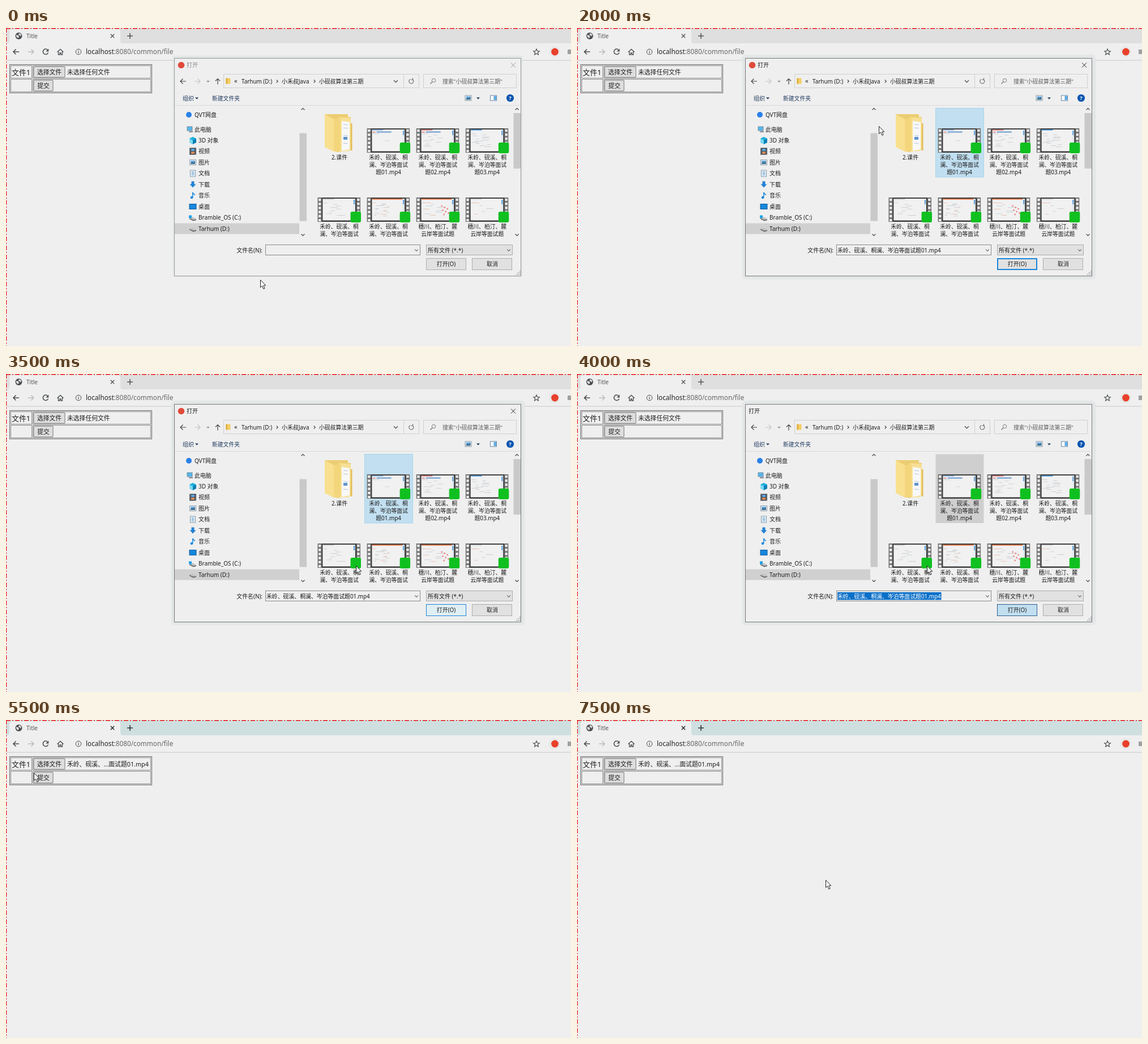
These frames come from a looping animation (998x561 px, 8000 ms). An HTML page:

```html
<!DOCTYPE html>
<html lang="zh-CN">
<head>
<meta charset="utf-8">
<style>
html, body { margin: 0; width: 998px; height: 561px; overflow: hidden; background: #efefef }
svg { display: block; font-family: "Noto Sans", "Noto Sans CJK SC", "Noto Sans CJK", sans-serif; white-space: pre }
</style>
</head>
<body>
<svg id="stage" width="998" height="561" viewBox="0 0 998 561"></svg>
<script>
const STEP = 500, STEPS = 16;
const BG = '#efefef', INK = '#1c1c1c', BLUE = '#1c86da';
const cursorAt = [[449, 444], [432, 391], [533, 173], [533, 173], [533, 173], [618, 339], [618, 339], [618, 338],
  [618, 338], [614.5, 336.5], [192, 221], [49, 93], [48, 89], [48, 87], [84, 108], [439, 282]];
const fileName = '禾岭、砚溪、桐澜、岑泊等面试题01.mp4';

const rect = (x, y, w, h, fill = 'none', stroke = 'none', rx = 0) =>
  `<rect x="${x}" y="${y}" width="${w}" height="${h}" fill="${fill}" stroke="${stroke}" rx="${rx}"/>`;
// A crisp one-pixel frame on the pixel grid
const box = (x, y, w, h, stroke, fill = 'none') => rect(x + .5, y + .5, w - 1, h - 1, fill, stroke);
const dot = (x, y, r, fill, stroke = 'none') => `<circle cx="${x}" cy="${y}" r="${r}" fill="${fill}" stroke="${stroke}"/>`;
const line = (d, stroke = '#444', w = 1, extra = '') =>
  `<path d="${d}" fill="none" stroke="${stroke}" stroke-width="${w}" ${extra}/>`;
const fill = (d, color) => `<path d="${d}" fill="${color}"/>`;
const text = (x, mid, s, size = 9.9, color = INK, anchor = 'start') =>
  `<text x="${x}" y="${mid + size * .36}" font-size="${size}" fill="${color}" text-anchor="${anchor}">${s}</text>`;
const chevron = (x, y, r, dir, color = '#444', w = 1.1) => line(dir === 'right'
  ? `M${x - r / 2} ${y - r}l${r} ${r}l${-r} ${r}`
  : `M${x - r} ${y - (dir === 'up' ? -r : r) / 2}l${r} ${dir === 'up' ? -r : r}l${r} ${dir === 'up' ? r : -r}`, color, w);
const cross = (x, y, r, color, w = 1.2) => line(`M${x - r} ${y - r}l${2 * r} ${2 * r}m0 ${-2 * r}l${-2 * r} ${2 * r}`, color, w);
const arrow = (x, y, dir, color, w = 1.4) =>
  line(`M${x - 5} ${y}h10m${dir > 0 ? -4.5 : -5.5} -4.5l${dir * 4.5} 4.5l${-dir * 4.5} 4.5`, color, w);

function browser(active) {
  const gray = '#4a4d50';
  return rect(0, 0, 998, 27, active ? '#cfdfe0' : '#dfdfdf')
    + fill('M2 27Q6 27 6 22V7Q6 2 11 2H197Q202 2 202 7V22Q202 27 206 27Z', BG)
    + dot(22.5, 14, 6, gray)
    + fill('M18 12l4 1 1 3-2 2-3-3zM23 9l4 2-1 4-2-2-2-1z', '#ddd')
    + text(36, 14, 'Title', 10, '#555')
    + cross(188, 14, 3.2, active ? '#222' : '#555', 1.4)
    + line('M214 14h10m-5 -5v10', active ? '#333' : '#555', 1.6)
    + arrow(18, 42, -1, gray, 1.6) + arrow(44, 42, 1, '#b9b9b9', 1.4)
    + line('M73.5 38.6a4.7 4.7 0 1 0 1 4.8', gray, 1.5) + fill('M75.3 36.5v5h-5z', gray)
    + line('M90.5 42.5L96 37.5l5.5 5M92.5 41.5v5.5h2.5v-3h2v3h2.5v-5.5', gray, 1.3)
    + dot(128, 42, 4.8, 'none', gray) + line('M128 41.2v3.4m0 -5.4v1.2', gray, 1.2)
    + text(141, 41.5, 'localhost<tspan fill="#666">:8080/common/file</tspan>', 11.75, '#222')
    + line('M937 37l1.5 3.5 3.8.3-2.9 2.5.9 3.7-3.3-2-3.3 2 .9-3.7-2.9-2.5 3.8-.3z', gray, 1.2)
    + dot(969, 42, 10, '#e8e8e8') + dot(969.5, 42, 6.4, '#e8402a')
    + rect(992, 38, 6, 8, '#a0a0a0')
    + rect(0, 56.5, 998, 1, '#c9c9c9')
    + line('M0 .7H998', '#f01818', 1.5, 'stroke-dasharray="8 3 2 3"')
    + line('M.6 0V561', '#f01818', 1.3, 'stroke-dasharray="8 3 2 3"');
}

function page(chosen, hover) {
  const cells = [66, 90].map(y => box(8, y, 38, 23, '#8a8a8a') + box(47, y, 209, 23, '#8a8a8a')).join('');
  return box(6, 64, 252, 51, '#666') + cells
    + text(10, 78, '文件1', 12.9)
    + rect(49, 68, 55, 19, '#dedede', '#777', 1) + text(76.5, 78, '选择文件', 10.8, INK, 'middle')
    + text(108, 78, chosen ? '禾岭、砚溪、…面试题01.mp4' : '未选择任何文件', 10.8)
    + rect(49, 92, 34, 19, hover ? '#d6d6d6' : '#dedede', hover ? '#444' : '#777', 1)
    + text(66, 102, '提交', 10.8, INK, 'middle');
}

const drive = (x, y) => fill(`M${x - 5} ${y + .5}l3 -2h3l6 3v1l-5 2z`, '#c2c2c2') + fill(`M${x - 5} ${y + .5}l7 3 5-1v1.5l-5 1.5-7-3.5z`, '#666');
const picture = (x, y) => rect(x - 5.5, y - 4.5, 11, 9, '#f8f8f8', '#8a98a5')
  + rect(x - 4, y - 3, 8, 3, '#67aee8') + fill(`M${x - 4} ${y + 3}v-2l3-2 2 1 3-2v5z`, '#3b6f8f');

function sidebar() {
  const rows = [['3D 对象', 198], ['视频', 217.5], ['图片', 237], ['文档', 256.5], ['下载', 276], ['音乐', 295.5],
    ['桌面', 315], ['Bramble_OS (C:)', 334.5], ['Tarhum (D:)', 354]];
  return rect(298, 344.5, 220, 19, '#d0d0d0')
    + dot(323, 153, 5, '#2a80e8') + text(333, 153, 'QVT网盘')
    + rect(320, 174, 9, 7, '#55b7ee', '#78909c') + rect(323, 182, 7, 2, '#889')
    + text(333, 179, '此电脑')
    + rows.map(([s, y]) => text(340, y, s, 10)).join('')
    + fill('M324 195l6-3 6 3v7l-6 3-6-3z', '#1cb0dc') + fill('M324 195l6 3v7l-6-3z', '#7ad8f0') + fill('M330 198l6-3v7l-6 3z', '#0b7fb6')
    + rect(324, 211.5, 12, 12, '#39424d') + rect(327, 213, 6, 4, '#5fa8e0') + rect(327, 218, 6, 4, '#d98b57')
    + line('M325.2 212v11m9.6 0v-11', '#ddd', 1, 'stroke-dasharray="1.4 1.4"')
    + picture(330, 237)
    + rect(325.5, 251, 9, 11, '#f5f9fc', '#7b95a8') + line('M327.5 254h5m-5 2.5h5m-5 2.5h5', '#3d86bd')
    + fill('M327.5 270.5h5v5h3l-5.5 6-5.5-6h3z', '#2482d4')
    + dot(328, 299, 2.3, '#1687dc') + line('M329.8 299v-9q1 3 4 4.5', '#1687dc', 1.5)
    + rect(324, 310.5, 12, 9, '#1687dc', '#0d5da0')
    + drive(329, 335) + rect(323, 330.5, 5, 5, '#1ba0e8') + drive(329, 354)
    + chevron(524.5, 143, 3, 'up') + chevron(524.5, 365, 3, 'down') + rect(518.5, 185.5, 12.5, 155, '#c9c9c9');
}

function thumb(x, y, kind) {
  let seed = kind * 37 + 5, marks = '';
  const rnd = () => (seed = seed * 16807 % 2147483647) / 2147483647;
  const n = [2, 10, 13, 9, 15, 9, 5][kind];
  for (let i = 0; i < n; i++)
    marks += rect(x + 10 + rnd() * 28, y + 9 + i * 25 / n, 4 + rnd() * 12, .8, kind > 3 && i % 4 == 0 ? '#e8b8a4' : '#c2c8ce');
  const head = ['#8fb4dc', '#d88080', '#58a0e0', '#c8c8c8', '#e0784c', '#e0784c', '#d0d0d0'][kind];
  if (kind == 5) for (let i = 0; i < 7; i++) marks += dot(x + 45 + i * 5 % 13, y + 15 + i * 2.5, 1.4, '#e88a8a');
  return rect(x, y, 75.5, 43, '#727272')
    + line(`M${x + 3.7} ${y + 2}v40m68.2 0v-40`, '#efefef', 4.2, 'stroke-dasharray="4.2 3"')
    + rect(x + 7.3, y + .5, 61, 42, '#303030') + rect(x + 8.8, y + 2, 57.5, 38.5, '#f1f1f1')
    + rect(x + 63, y + 2, 3.5, 38.5, '#e4eaf0') + rect(x + 63.5, y + 4, 2, 8, '#5b9cd8')
    + rect(x + 8.8, y + 2, kind == 4 || kind == 5 ? 54 : 20, 1.8, head)
    + (kind < 2 ? rect(x + 10, y + 6, 5, 1.5, '#d88080') + rect(x + 17, y + 5.5, 26, 2, '#6c9cd0') : '')
    + marks
    + rect(x + 58, y + 25, 18.5, 19, '#10c020', 'none', 3);
}

function files(selectColor) {
  const big = ['禾岭、砚溪、桐', '澜、岑泊等面试'], other = ['穗川、柏汀、麓', '云岸等面试题'];
  let out = selectColor ? rect(633.5, 141.5, 85, 121.5, selectColor, selectColor === '#cfcfcf' ? 'none' : '#a6d5ec') : '';
  out += fill('M563 152h41v5h5v57l-23 5-23-9z', '#edcd72')
    + fill('M588 157l21 2v53l-3 5-18 1z', '#f7e094')
    + fill('M593 164l14 2v48l-14 3z', '#f8f8f8')
    + line('M596 170l8 1m-8 5l8 1m-8 12l8 1m-8 13l8 1', '#b4c6d8') + rect(596, 192, 7, 5, '#5f93cc')
    + fill('M609 168h2.5v48h-3z', '#e3bf5c')
    + fill('M563 152l16 9v57l-16-8z', '#f9e08f') + fill('M579 161l12-2v58l-12 1z', '#f3d67c')
    + text(589, 228, '2.课件', 9.9, INK, 'middle');
  for (let k = 0; k < 7; k++) {
    const row = k < 3 ? 0 : 1, col = row ? k - 3 : k + 1, x = 550.5 + col * 87.1, y = 177 + row * 122;
    const label = k > 4 ? other : big;
    out += thumb(x, y, k) + label.map((s, i) => text(x + 38, y + 51 + i * 13, s, 9.8, INK, 'middle')).join('');
    if (!row) out += text(x + 38, y + 77, `题0${k + 1}.mp4`, 9.9, INK, 'middle');
  }
  return out + chevron(902.5, 143, 3, 'up') + chevron(902.5, 365, 3, 'down') + rect(896.5, 150, 12.5, 98, '#c9c9c9');
}

function dialog(step) {
  const active = step >= 4, closing = step == 8, hover = step >= 6;
  const shade = active ? rect(292, 47, 624, 396, '#e2e6e6', 'none', 7) : rect(295, 49, 617, 390, '#e0e5e5', 'none', 4);
  const open = closing ? ['#c2dff0', '#2a6090'] : hover ? ['#e0eff4', BLUE] : active ? ['#e1e1e1', BLUE] : ['#e1e1e1', '#adadad'];
  const nav = '#203a60';
  return `<g filter="url(#soft)">${shade}</g>` + box(297, 53, 613, 385, active ? '#777' : '#989898', BG)
    + (closing ? '' : dot(309.5, 65.5, 5.8, '#e04a3a') + cross(896, 65.5, 4, active ? '#222' : '#999', 1))
    + text(closing ? 303 : 319, 65.5, '打开', 10, active ? INK : '#888')
    + arrow(313, 94, -1, '#444', 1.2) + arrow(338, 94, 1, '#c4c4c4', 1.2) + chevron(357, 94, 2, 'down', '#777')
    + line('M374 99.5v-10m-4 4l4 -4l4 4', '#444', 1.2)
    + box(384, 81, 346, 25, '#d0d0d0') + rect(702, 81, 1, 25, '#d0d0d0')
    + rect(388.5, 88.5, 8, 10, '#f3cf68') + rect(388.5, 88.5, 2.5, 10, '#dcae3c')
    + text(403, 93, '«', 11) + text(416, 94, 'Tarhum (D:)', 9.9) + chevron(479, 94, 2.5, 'right')
    + text(487, 94, '小禾叔Java', 9.9) + chevron(545, 94, 2.5, 'right') + text(553, 94, '小砚叔算法第三期', 9.8)
    + chevron(688.5, 94, 3.5, 'down', '#555', 1.4)
    + line('M718.5 91a4 4 0 1 1 -4.5 -.6m4.5 -2.4v3.2h-3.2', '#666', 1.1)
    + box(737, 81, 165, 25, '#d0d0d0') + dot(755.5, 92.5, 3.2, 'none', '#777') + line('M753 95l-3.5 3.5', '#777', 1.2)
    + text(771, 94, '搜索"小砚叔算法第三期"', 9.8, '#5c5c5c')
    + text(312, 124, '组织', 10, nav) + fill('M334 122.5h6l-3 3.2z', nav) + text(364, 124, '新建文件夹', 9.8, nav)
    + picture(816.5, 123.5) + fill('M831 122.5h6l-3 3.2z', nav)
    + rect(855.5, 119, 11, 9, '#f8f8f8', '#6888a8') + rect(861.5, 120, 4.5, 7, '#62aee4')
    + dot(890.5, 123.5, 6.6, '#0b55b0') + text(890.5, 123.5, '<tspan font-weight="700">?</tspan>', 9.5, '#fff', 'middle')
    + rect(298, 136, 611, 1, '#dadada')
    + sidebar() + files(closing ? '#cfcfcf' : active ? '#c1dff0' : '')
    + text(453, 392, '文件名(N):', 9.9, INK, 'end') + box(458, 382, 274, 19, '#8a8a8a')
    + (closing ? rect(460, 385, 183.5, 13.5, '#0a6fc8') : '')
    + (active ? text(460, 392, fileName, 9.87, closing ? '#fff' : INK) : '')
    + chevron(725, 392, 2.8, 'down', '#666')
    + box(742, 382, 153, 19, '#adadad', '#e1e1e1') + text(745, 392, '所有文件 (*.*)', 10) + chevron(888, 392, 2.8, 'down', '#666')
    + box(742, 406, 71, 21, open[1], open[0])
    + (active && !hover ? box(743, 407, 69, 19, open[1]) : '')
    + text(777.5, 416.5, '打开(O)', 9.9, INK, 'middle')
    + box(823, 406, 71, 21, '#adadad', '#e1e1e1') + text(859, 416.5, '取消', 9.9, INK, 'middle')
    + [[0, 0], [3, 0], [6, 0], [3, -3], [6, -3], [6, -6]].map(([x, y]) => rect(901 + x, 434 + y, 1.6, 1.6, '#999')).join('');
}

function scene(step) {
  const done = step > 8, [x, y] = cursorAt[step];
  return '<filter id="soft" x="-5%" y="-5%" width="110%" height="110%"><feGaussianBlur stdDeviation="1.2"/></filter>'
    + browser(done) + page(done, step == 12 || step == 13) + (done ? '' : dialog(step))
    + `<path transform="translate(${x + .5} ${y + .5})" d="M0 0V13.2L3.1 10.4 5.3 15.8 7.6 14.9 5.4 9.6H9.3Z" fill="#fff" stroke="#222"/>`;
}

const stage = document.getElementById('stage');
let shown = -1;
function tick(now) {
  const step = Math.floor(now / STEP) % STEPS;
  if (step !== shown) stage.innerHTML = scene(shown = step);
  requestAnimationFrame(tick);
}
tick(0);
</script>
</body>
</html>
```
